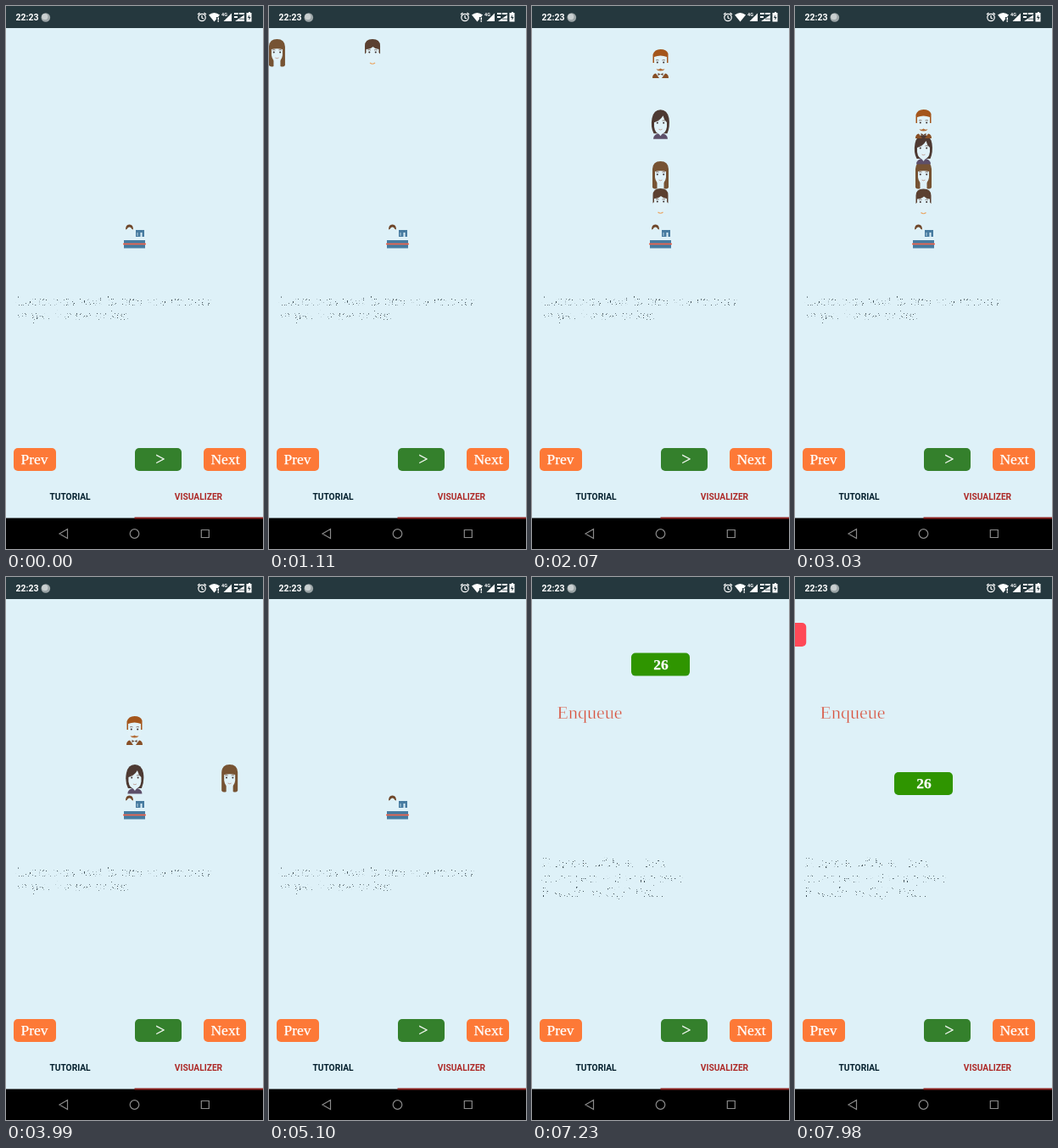
An HTML page for the animation above (8 s loop, 303x640 px).

```html
<!DOCTYPE html>
<html lang="en">
<head>
<meta charset="utf-8">
<title>Queue visualizer</title>
<style>
html, body { margin: 0; width: 100%; height: 100%; overflow: hidden; background: #def1f8; }
svg { display: block; width: 100%; height: 100%; }
.serif { font-family: "Liberation Serif", serif; font-size: 17.5px; text-anchor: middle; }
.label { fill: #fff; stroke: #fff; stroke-width: .25; }
.heading { font-size: 22px; fill: #d8523e; stroke: #def1f8; stroke-width: .45; }
.ui { font: 700 10.2px Roboto, sans-serif; text-anchor: middle; }
.speckled { font: 16.5px "Liberation Serif", serif; fill: url(#specks); }
</style>
</head>
<body>
<svg viewBox="0 0 303 640">
  <defs>
    <pattern id="specks" width="53" height="47" patternUnits="userSpaceOnUse"></pattern>
    <g id="eyes">
      <path d="M-5.500 13q2-1 3.500 0M2 13q1.500-1 3.500 0" fill="none" stroke="#6b5146" stroke-width=".7"/>
      <circle cx="-3.700" cy="15.500" r="1" fill="#3b3030"/><circle cx="3.700" cy="15.500" r="1" fill="#3b3030"/>
    </g>
  </defs>
  <rect width="303" height="640" fill="#def1f8"/>

  <g id="ticketScene">
    <g>
      <path d="M141 263.500q0-6 4.500-6t4.500 6l-1.500-.5q-1-2.500-3-2.500t-3 2.500z" fill="#70482b"/>
      <path d="M153 264h10v8h-2.500v-5h-2v5h-5.500z" fill="#477ba0"/>
      <path d="M154.500 267h1v4h-1z" fill="#b7d4e2"/>
      <path d="M139 276h25v9.500h-25z" fill="#477ba0"/>
      <path d="M138 280.500h27" stroke="#f0644c" stroke-width="1.700"/>
    </g>
    <text class="speckled" x="11" y="353">Customers wait in turn at a counter</text>
    <text class="speckled" x="13" y="370">to pay for the ticket.</text>

    <g class="person">
      <path d="M-8 8h16v10q-1 8-8 9q-7-1-8-9z" fill="#e1f2f8"/>
      <path d="M-9 17.500V8q0-8 9-8t9 8v9.500l-1.500-1.500v-4q-4 0-7-3q-3 3-8 3v4z" fill="#5b4030"/>
      <use href="#eyes"/>
      <path d="M-3 28q3 2.500 6 0" fill="none" stroke="#eaa765" stroke-width="1.200"/>
    </g>
    <g class="person">
      <path d="M-9.500 31V9Q-9 0 0 0T9.500 9v22q-2 2.500-5.500 1V25h-8v7q-3.500 1.500-5.500-1z" fill="#765333"/>
      <path d="M-6.500 12q6.500-1.500 13 0v7q-1 7-6.500 8q-5.500-1-6.500-8z" fill="#e1f2f8"/>
      <use href="#eyes"/>
      <path d="M-2 22q2 1.500 4 0" fill="none" stroke="#b78f82" stroke-width=".8"/>
    </g>
    <g class="person">
      <path d="M-8.500 34.500q0-6 8.500-7q8.500 1 8.500 7z" fill="#5d4f69"/>
      <path d="M-8 28q-4-8-2-18q2-10 10-10t10 10q1.500 10-2 18z" fill="#4d3a33"/>
      <path d="M-7.500 15q7-2 10.500-8q1 5 4.500 8v5q-1 8-7.500 9q-6.500-1-7.500-9z" fill="#e1f2f8"/>
      <path d="M-3 27h6l-3 4z" fill="#e1f2f8"/>
      <use href="#eyes"/>
      <path d="M-2 23q2 1.500 4 0" fill="none" stroke="#b78f82" stroke-width=".8"/>
    </g>
    <g class="person">
      <path d="M-8 7H8v12q-1 8-8 9q-7-1-8-9z" fill="#e1f2f8"/>
      <path d="M-9 16V6q2-6 9-6t9 5v11H7.500V9Q0 6-7.500 9v7z" fill="#a4561c"/>
      <use href="#eyes"/>
      <path d="M-5 23q3 1.500 5-.5q2 2 5 .5q-1 2.500-5 2.500t-5-2.500z" fill="#b26b35"/>
      <path d="M-9.500 34q0-5 4-5.500l4 5.500zM9.500 34q0-5-4-5.500l-4 5.500z" fill="#885027"/>
      <path d="M-3 28l3 1.500l3-1.500v3l-3-1.500l-3 1.500z" fill="#68452f"/>
    </g>
  </g>

  <g id="enqueueScene">
    <g class="serif"><text class="heading" x="68" y="167">Enqueue</text></g>
    <text class="speckled" x="12" y="342">Enqueue adds an item</text>
    <text class="speckled" x="11" y="360">at the rear end of a queue.</text>
    <text class="speckled" x="11" y="377">It works in O(1) time.</text>
    <g class="box"><rect width="69" height="27" rx="5" fill="#2f9500"/>
      <text class="serif label" x="35" y="19" font-weight="700">26</text></g>
    <g class="box"><rect width="69" height="28" rx="5" fill="#ff4957"/></g>
  </g>

  <g class="serif">
    <rect x="9" y="521" width="50" height="27" rx="5" fill="#fd7937"/>
    <rect x="152" y="521" width="55" height="27" rx="5" fill="#34802c"/>
    <rect x="233" y="521" width="50" height="27" rx="5" fill="#fd7937"/>
    <g class="label">
      <text x="33.500" y="540">Prev</text>
      <text x="182" y="540.500" style="font-size:20px">&gt;</text>
      <text x="258.500" y="540">Next</text>
    </g>
  </g>
  <g class="ui">
    <text x="75.500" y="582" fill="#04202e">TUTORIAL</text>
    <text x="227" y="582" fill="#ad2a28">VISUALIZER</text>
  </g>
  <path d="M0 603.500h303V640H0z"/>
  <path d="M151.500 602.500H303v2H151.500z" fill="#8d211e"/>
  <g fill="none" stroke="#8a8a8a" stroke-width="1.200">
    <path d="M72.500 616.500v11l-9.500-5.500zM230.300 617.500h9v9h-9z"/>
    <circle cx="151.500" cy="622" r="5.300"/>
  </g>

  <path d="M0 0h303v26H0z" fill="#25383e"/>
  <g fill="#fff">
    <text class="ui" x="25" y="17" style="font-size:10.500px">22:23</text>
    <circle cx="46.800" cy="13.500" r="5.300" fill="#9ca5a7"/>
    <circle cx="45.800" cy="12.500" r="3.600" fill="#c9cfd0"/>
    <g fill="none" stroke="#fff" stroke-width="1.200">
      <circle cx="231" cy="13.500" r="4.200"/>
      <path d="M231 11v3l2 1M226 10l2.500-2M236 10l-2.500-2"/>
    </g>
    <path d="M239 10.500q6.500-5 13 0L245.500 18.500z"/>
    <path id="wifiNotch" d="M248 13h5v6h-5z" fill="#25383e"/>
    <path id="wifiMark" d="M249.500 13.500h1.500v3h-1.500zM249.500 17.300h1.500v1.500h-1.500z"/>
    <text class="ui" x="257.500" y="11.500" style="font-size:5.500px">4G</text>
    <path d="M266 8.500v9.500h-9.500z"/>
    <path d="M269 8h5v2h-5zM275 8h6v2h-6zM269 12h4v2h-4zM281 10.500v7.500h-11z"/>
    <path d="M275 15.200h6" stroke="#25383e" stroke-width=".8"/>
    <path d="M285 8h1v-1h2v1h1.500v10.500H283.500V8z"/>
    <path d="M286.800 10l-1.800 4h1.500v3l2-4h-1.700z" fill="#25383e"/>
  </g>
</svg>
<script>
const LOOP = 8000;
const CENTER = 151.5;
const SPEED = 0.417; // horizontal pixels per ms
const $ = id => document.getElementById(id);
const clamp = v => Math.max(0, Math.min(1, v));
const mix = (a, b, p) => a + (b - a) * p;
const show = (el, on) => el.style.display = on ? "" : "none";
const place = (el, x, y) => el.setAttribute("transform", `translate(${x.toFixed(2)} ${y.toFixed(2)})`);

const people = [...document.querySelectorAll(".person")];
const boxes = [...document.querySelectorAll(".box")];
const queueTops = [215, 183, 152, 122];

// Sparse seeded dots, visible only inside the glyphs.
let seed = 11;
const random = () => (seed = seed * 16807 % 2147483647) / 2147483647;
let dots = "";
for (let i = 0; i < 330; i++)
  dots += `M${Math.floor(random() * 53)} ${Math.floor(random() * 47)}h1v1h-1z`;
$("specks").innerHTML = `<path d="${dots}" fill="#3f4f57"/>`;

function movePerson(el, i, t) {
  const arriving = t - 780 - 270 * i;
  const leaving = t - 2993 - 268 * i;
  let x = Math.min(CENTER, -16 + SPEED * arriving);
  let y = mix(39, queueTops[i], clamp((arriving - 415) / 456));
  if (leaving > 0) {
    x = CENTER + SPEED * Math.max(0, leaving - 461);
    y = mix(queueTops[i], 221, clamp(leaving / 458));
  }
  show(el, arriving > 0 && x < 325);
  place(el, x, y);
}

function moveBox(el, i, t) {
  const elapsed = t - 6690 - 1259 * i;
  show(el, elapsed > 0);
  place(el, mix(-69, 117, clamp(elapsed / 450)), mix(54, 230, clamp((elapsed - 450) / 450)));
}

function draw(t) {
  show($("ticketScene"), t < 5800);
  show($("enqueueScene"), t >= 6560);
  const strongWifi = t >= 1200 && t < 2300;
  show($("wifiNotch"), !strongWifi);
  show($("wifiMark"), !strongWifi);
  people.forEach((el, i) => movePerson(el, i, t));
  boxes.forEach((el, i) => moveBox(el, i, t));
}

const start = performance.now();
function tick() {
  draw((performance.now() - start) % LOOP);
  requestAnimationFrame(tick);
}
tick();
</script>
</body>
</html>
```
